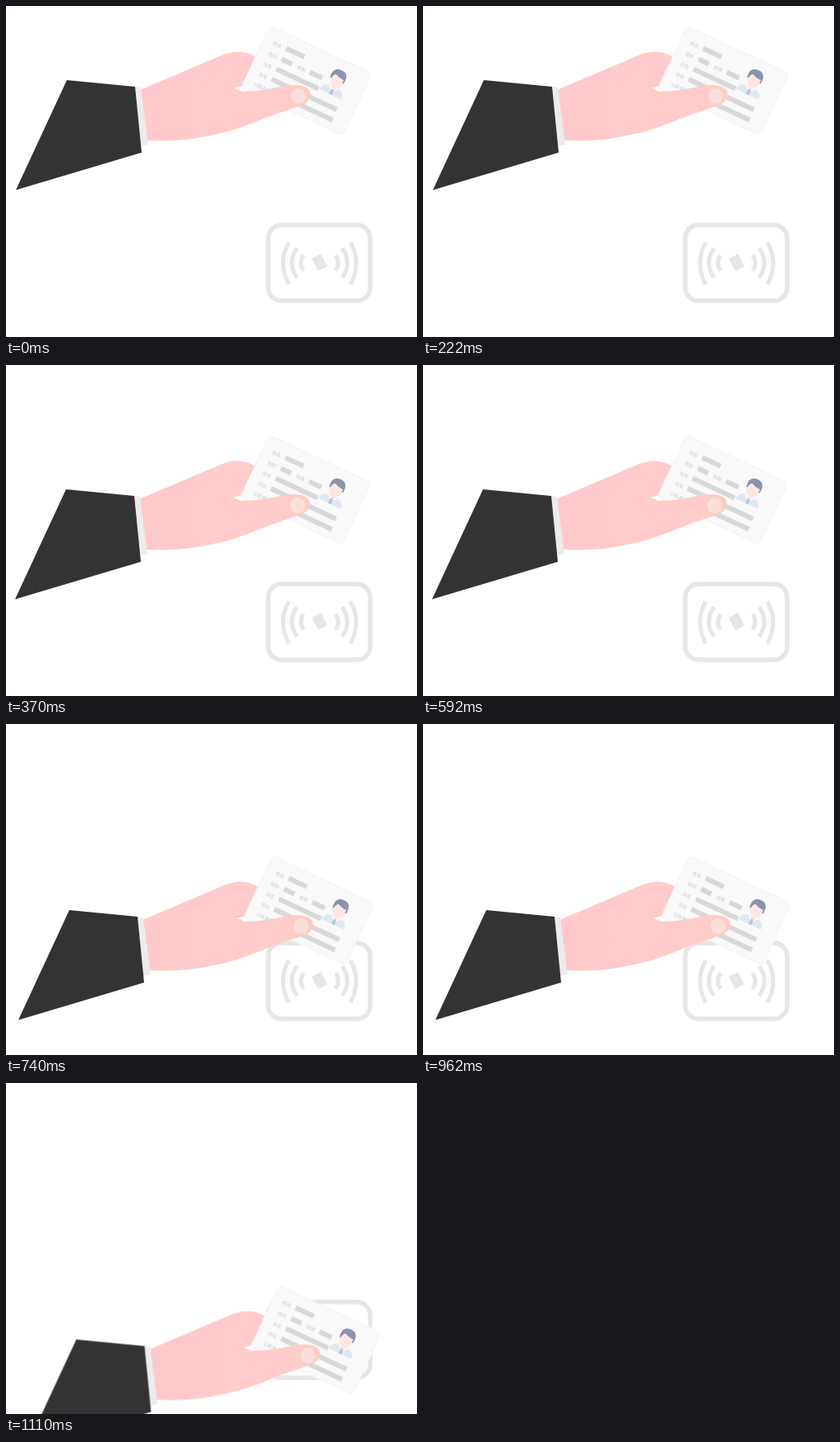
These frames come from a looping animation (500 px wide and 402 px high, 1480 ms). An HTML page:

```html
<!DOCTYPE html>
<html lang="zh">
<head>
<meta charset="utf-8">
<title>Card tap</title>
<style>
  html, body { margin: 0; width: 100%; height: 100%; overflow: hidden; background: #fff; }
  svg { display: block; width: 500px; height: 402px; }
  text { font: 5.6px "Noto Sans CJK SC", "Noto Sans CJK", sans-serif; fill: #c9c9c9; }
  .reader { fill: none; stroke: #e6e6e6; stroke-width: 5.5; }
  .bars { stroke: #d9d9d9; stroke-width: 6; }
</style>
</head>
<body>
<svg viewBox="0 0 500 402">
  <defs>
    <linearGradient id="skin" gradientUnits="userSpaceOnUse" x1="165" y1="0" x2="370" y2="0">
      <stop offset="0" stop-color="#ffc9cb"/>
      <stop offset=".7" stop-color="#ffcccb"/>
      <stop offset="1" stop-color="#fccdc6"/>
    </linearGradient>
    <g id="waves">
      <path d="M362 302.5Q355.500 312 362 321.500"/>
      <path d="M354 294Q341.500 312 354 330"/>
      <path d="M344 287Q330 312 344 338"/>
    </g>
  </defs>

  <g class="reader">
    <rect x="319" y="266" width="124" height="92" rx="16"/>
    <g stroke-width="5">
      <use href="#waves"/>
      <use href="#waves" transform="translate(763) scale(-1 1)"/>
    </g>
    <rect x="-6.300" y="-8.500" width="12.600" height="17" fill="#e6e6e6" stroke="none"
          transform="translate(381.500 311.500) rotate(-27)"/>
  </g>

  <g id="arm">
    <!-- palm -->
    <path fill="url(#skin)" d="M163 102L262 60Q286 50 304 62L318 70L288 97L277 100L287 104L310 103V138
      Q278 152 250 157Q210 166 171 163Z"/>
    <path fill="#ececec" d="M156 98L164 99L173 168.500L164 170Z"/>
    <path fill="#333" d="M74 90L157 98L165 178L12 223.500Z"/>

    <g transform="translate(321 24) rotate(25)">
      <rect width="137" height="83" rx="5" fill="#f9f9f9" stroke="#f1f1f1" stroke-width=".8"/>
      <g id="labels"></g>
      <g id="bars" class="bars"></g>
      <g transform="translate(102 0)">
        <path fill="#dfe9f4" d="M-15 44.500Q-15 36 -6 34.500H6Q15 36 15 44.500Z"/>
        <path fill="#fff" d="M-6 34.500H6L0 42Z"/>
        <path fill="#b9c4da" d="M-1.500 37H1.500L2 44.500H-2Z"/>
        <path fill="#ffe6e3" d="M-8 21H8V26Q8 32 3.500 34V36L0 38L-3.500 36V34Q-8 32 -8 26Z"/>
        <path fill="#8b94aa" d="M-9 26Q-12 12 0 12Q11 12 9 26L7.500 26V22Q1 22 -4 19.500Q-7 21 -7.500 26Z"/>
      </g>
    </g>

    <!-- thumb -->
    <path fill="url(#skin)" d="M277 100L287 104Q305 104 325 100Q342 96 352 96Q370 97 370.500 107
      Q370 117 358 121Q325 132 300 142L270 151V104Z"/>
    <ellipse cx="356" cy="109.500" rx="9" ry="9.500" fill="#fcdfdb"/>
  </g>
</svg>
<script>
  const NS = 'http://www.w3.org/2000/svg';
  const STEP = 370;
  const OFFSETS = [[0, 0], [-1, 61], [3, 136], [11.5, 221.5]];

  // [label, label x, row centre, bar start, bar end]
  const FIELDS = [
    ['姓名', 12.5, 16.5, 29.5, 54],
    ['性别', 12.5, 30.7, 30, 44],
    ['民族', 51, 30.7, 68, 84.5],
    ['出生', 12.5, 44.3, 29.5, 86],
    ['住址', 12.5, 58, 29.5, 117],
    ['公民身份号码', 12.5, 71.5, 47, 117.5]
  ];

  function add(parent, tag, attrs, content = '') {
    const node = document.createElementNS(NS, tag);
    for (const key in attrs) node.setAttribute(key, attrs[key]);
    node.textContent = content;
    document.getElementById(parent).append(node);
  }

  for (const [label, x, y, start, end] of FIELDS) {
    add('labels', 'text', { x, y: y + 2.6 }, label);
    add('bars', 'path', { d: `M${start} ${y}H${end}` });
  }

  const pose = ([x, y], i) => ({
    transform: `translate(${x}px, ${y}px)`,
    offset: i / OFFSETS.length,
    easing: 'step-end'
  });
  const poses = OFFSETS.map(pose);
  poses.push({ ...poses[poses.length - 1], offset: 1 });

  document.getElementById('arm').animate(poses, {
    duration: STEP * OFFSETS.length,
    iterations: Infinity
  });
</script>
</body>
</html>
```
